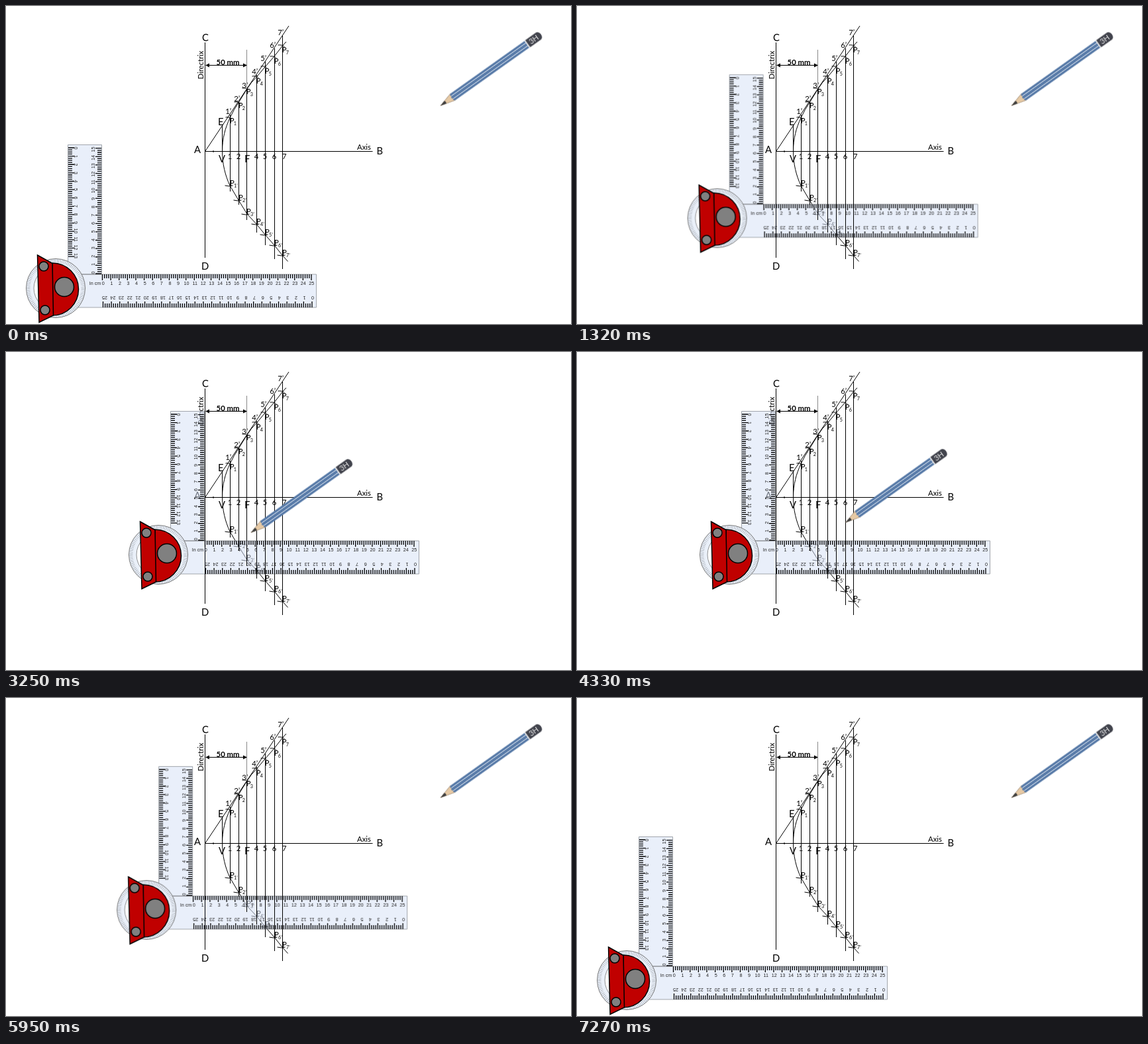
These frames come from a looping animation (853 by 480 pixels, 7330 ms). An HTML page:

```html
<!DOCTYPE html>
<html lang="en">
<head>
<meta charset="utf-8">
<title>Conic construction</title>
<style>
  html, body { margin: 0; width: 100%; height: 100%; overflow: hidden; background: #fff; }
  svg { display: block; width: 853px; height: 480px; }
  text { font-family: Lato, "Open Sans", sans-serif; font-size: 11.3px; }
  .big { font-size: 14.8px; }
  .sub { font-size: 7.2px; }
  .scale text { font: 7.2px "Liberation Sans", Arial, sans-serif; text-anchor: middle; fill: #222; }
  .ink { fill: none; stroke: #000; stroke-width: 1; }
  #ruler { animation: slide 7330ms infinite; }
  #pencil { animation: draw 7330ms infinite; }
  /* Each move speeds up to its midpoint, then slows down evenly. */
  @keyframes slide {
    0% { transform: none; }
    0.996% { transform: translate(0, 0); animation-timing-function: cubic-bezier(.3333, 0, .6667, .3333); }
    12.251% { transform: translate(77.5px, -60px); animation-timing-function: cubic-bezier(.3333, .6667, .6667, 1); }
    23.506% { transform: translate(155px, -120px); }
    75.784% { transform: translate(155px, -120px); animation-timing-function: cubic-bezier(.3333, 0, .6667, .3333); }
    87.04% { transform: translate(77.5px, -60px); animation-timing-function: cubic-bezier(.3333, .6667, .6667, 1); }
    98.295%, 100% { transform: translate(0, 0); }
  }
  @keyframes draw {
    0%, 27.012% { transform: translate(0, 0); animation-timing-function: cubic-bezier(.3333, 0, .6667, .3333); }
    37.995% { transform: translate(-157px, 67px); animation-timing-function: cubic-bezier(.3333, .6667, .6667, 1); }
    48.977% { transform: translate(-314px, 134px); }
    51.705% { transform: translate(-314px, 134px); animation-timing-function: cubic-bezier(.3333, 0, .6667, .3333); }
    63.302% { transform: translate(-157px, 67px); animation-timing-function: cubic-bezier(.3333, .6667, .6667, 1); }
    74.898%, 100% { transform: translate(0, 0); }
  }
</style>
</head>
<body>
<svg viewBox="0 0 853 480">
  <g id="labels">
    <text class="big" x="296" y="53">C</text>
    <text class="big" x="295" y="398">D</text>
    <text class="big" x="284" y="222">A</text>
    <text class="big" x="559.500" y="223.500">B</text>
    <text class="big" x="320" y="180">E</text>
    <text class="big" x="321" y="236">V</text>
    <text class="big" x="360" y="236">F</text>
    <text x="530" y="217">Axis</text>
    <text transform="translate(298 110.500) rotate(-90)">Directrix</text>
    <text x="335" y="89" text-anchor="middle" font-weight="bold">50 mm</text>
  </g>
  <g id="curve" class="ink">
    <path d="M423 54L417.500 60L405 76L391 92L378 107.500Q370 115 364 125L351 146Q344 156 338 169C331 184 326.500 200 326.500 219C326.500 238 331 256 338 271L351 293L364 314L378 329L391 345L405 361L417 376L425.500 385.500"/>
  </g>

  <g id="ruler">
    <g fill="#d6e2f6" fill-opacity=".54" stroke="#8d9298" stroke-width=".8">
      <path d="M93.500 209.500H144.500V405H468.500V455H93.500Z"/>
      <path d="M106 405H144.500" stroke="#444"/>
    </g>
    <g id="scale" class="scale"></g>
    <circle cx="75" cy="426" r="44.500" fill="#eaf0f9" stroke="#666" stroke-width=".9"/>
    <circle cx="75" cy="426" r="41" fill="none" stroke="#8a8f98" stroke-width="5" stroke-dasharray=".5 2"/>
    <circle cx="75" cy="426" r="33" fill="#fff" stroke="#777" stroke-width=".8"/>
    <g fill="#c00000" stroke="#000" stroke-width="1.500">
      <path d="M70 388A39.500 39.500 0 0 1 70 467Z"/>
      <path d="M47.500 376L70 388.500L71.500 467L50 477.500Z"/>
      <g fill="#808080">
        <circle cx="57" cy="393" r="7"/>
        <circle cx="59" cy="459" r="7"/>
        <circle cx="88" cy="424" r="14.500"/>
      </g>
    </g>
  </g>

  <g id="lines" class="ink">
    <path d="M300.500 55V380M300 219.500H553.500M300.500 219.500L427 30M326.500 181V219.500M313 218V221"/>
    <path d="M363.500 66V125" stroke="#888"/>
    <path d="M302 89.500H363"/>
    <path d="M301 89.500l6-3v6zM364 89.500l-6-3v6z" fill="#000" stroke="none"/>
  </g>

  <g id="pencil">
    <g transform="translate(656 150.500) rotate(-35.400)">
      <path d="M0 0L23 -6.200L25 0L23 6.200Z" fill="#e6c9a4" stroke="#8b7a66" stroke-width=".6"/>
      <path d="M0 0L9 -2.500L10 0L9 2.500Z" fill="#404040"/>
      <path d="M23 -6.200H161V6.200H23Q19 4 22 2Q18 0 22 -2Q19 -4 23 -6.200Z" fill="#5a7ca9"/>
      <path d="M22 -2.500H160M22 2.500H160" stroke="#c9d6e6"/>
      <path d="M160.500 -6.200V6.200" stroke="#eee" stroke-width="1.500"/>
      <path d="M161.500 -6.500H182Q186 -5 186 0T182 6.500H161.500Z" fill="#42444d"/>
      <text x="172.500" y="4" text-anchor="middle" fill="#e8e8e8">3H</text>
    </g>
  </g>
</svg>
<script>
  const byId = id => document.getElementById(id);

  function add(parent, tag, attrs, content = "") {
    const el = document.createElementNS("http://www.w3.org/2000/svg", tag);
    for (const key in attrs) el.setAttribute(key, attrs[key]);
    el.textContent = content;
    parent.append(el);
    return el;
  }

  // Per ordinate: name, x, top, bottom, then the upper and lower curve heights.
  const ordinates = [
    [1, 338.5, 164, 280, 169, 271],
    [2, 351.5, 145, 300, 146, 293],
    [3, 363.5, 125, 323, 125, 314],
    [4, 378.5, 104, 342, 107, 329],
    [5, 391.5, 84, 361, 92, 345],
    [6, 405.5, 64, 382, 77, 361],
    [7, 417.5, 45, 397, 60, 376]
  ];
  const labels = byId("labels"), lines = byId("lines"), curve = byId("curve");

  function pointLabel(x, y, sub) {
    add(labels, "text", { x, y }, "P");
    add(labels, "text", { x: x + 6, y: y + 3, class: "sub" }, sub);
  }

  for (const [n, x, top, bottom, up, low] of ordinates) {
    add(lines, "path", { d: `M${x} ${top}V${bottom}` });
    add(labels, "text", { x: x - 7.3, y: top - 1.5 }, n + "’");
    if (n !== 3) add(labels, "text", { x: x - (n === 7 ? 0.5 : 3.8), y: 231 }, n);
    pointLabel(x - 0.8, up + (n < 4 ? 8 : 9.5), n);
    pointLabel(x - 0.5, low, n + "’");
    add(curve, "path", { d: `M${x - 7} ${up - 1}q7 -1 10 3M${x - 8} ${low}q7 2 12 0` });
  }

  // A row of ticks from a start point; (dx, dy) is one cm, (tx, ty) the tick direction.
  const scale = byId("scale");
  function ticks(x, y, dx, dy, tx, ty, cm) {
    let d = "";
    for (let i = 0; i <= cm * 4; i++) {
      const len = i % 4 ? 6 : 9;
      d += `M${x + dx * i / 4} ${y + dy * i / 4}l${tx * len} ${ty * len}`;
    }
    add(scale, "path", { d, stroke: "#000", "stroke-width": 1.3, fill: "none" });
  }

  function numbers(x, y, dx, dy, turn, last) {
    for (let i = 0; i <= last; i++) {
      const place = `translate(${x + dx * i} ${y + dy * i}) rotate(${turn})`;
      add(scale, "text", { transform: place, y: 2.6 }, i);
    }
  }

  const cm = 12.62;
  ticks(145.5, 405, cm, 0, 0, 1, 25);
  numbers(146.8, 418, 12.58, 0, 0, 25);
  ticks(462, 455, -cm, 0, 0, -1, 25);
  numbers(463, 441, -12.56, 0, 180, 25);
  ticks(94, 214, 0, cm, 1, 0, 13);
  numbers(106, 214.5, 0, 12.5, 90, 13);
  ticks(144, 404, 0, -cm, -1, 0, 15);
  numbers(131, 402.5, 0, -12.4, -90, 15);
  add(scale, "text", { x: 134.5, y: 420.6 }, "In cm");
</script>
</body>
</html>
```
